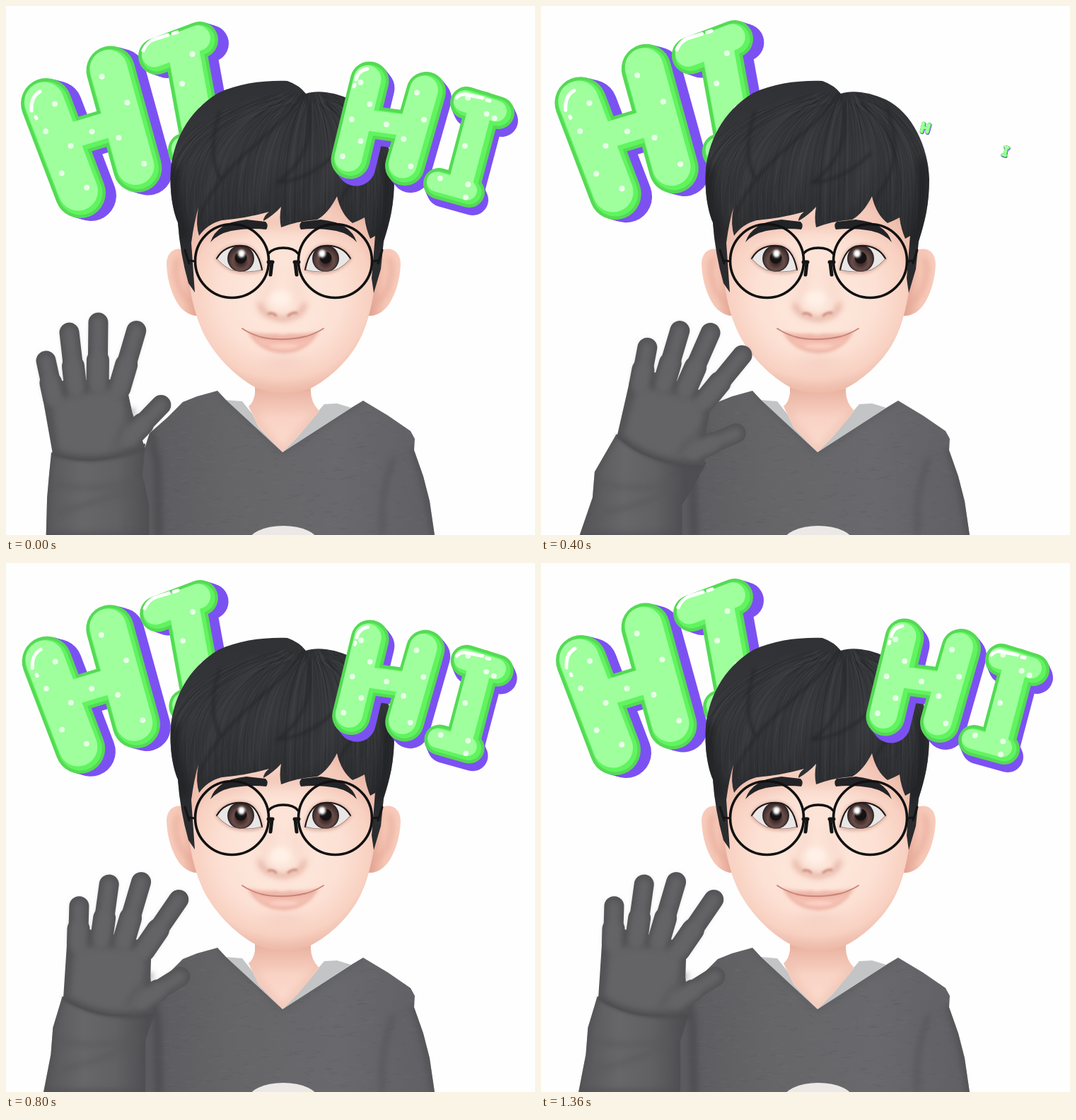
These frames come from a looping animation (748x748 px, 1.44 s). An HTML page with a canvas:

```html
<!DOCTYPE html>
<html lang="en">
<head>
<meta charset="utf-8">
<title>Waving hello</title>
<style>
html, body { margin: 0; width: 100%; height: 100%; overflow: hidden; background: #fefefe; }
canvas { display: block; width: 100vw; height: 100vh; }
</style>
</head>
<body>
<canvas id="stage" width="748" height="748"></canvas>
<script>
const SIZE = 748, STEP = 80, STEPS = 18;
let g = document.getElementById('stage').getContext('2d');

// ---------- helpers ----------
function random(seed) {
  return () => (seed = (seed * 16807) % 2147483647) / 2147483647;
}

function fill(d, color) {
  g.fillStyle = color;
  g.fill(new Path2D(d));
}

function line(d, color, width) {
  g.strokeStyle = color;
  g.lineWidth = width;
  g.stroke(new Path2D(d));
}

function ellipse(x, y, rx, ry, color) {
  g.fillStyle = color;
  g.beginPath();
  g.ellipse(x, y, rx, ry, 0, 0, 2 * Math.PI);
  g.fill();
}

function scoped(draw) {
  g.save();
  draw();
  g.restore();
}

function blurred(amount, draw) {
  scoped(() => { g.filter = `blur(${amount}px)`; draw(); });
}

function clipped(d, draw) {
  scoped(() => { g.clip(new Path2D(d)); draw(); });
}

function gradient(grad, ...colors) {
  colors.forEach((c, i) => grad.addColorStop(i / (colors.length - 1), c));
  return grad;
}

function layer(draw) {
  const canvas = document.createElement('canvas');
  canvas.width = canvas.height = SIZE;
  const previous = g;
  g = canvas.getContext('2d');
  g.lineCap = g.lineJoin = 'round';
  draw();
  g = previous;
  return canvas;
}

// Draws the left side, then its mirror image about the axis of the face.
function bothSides(draw) {
  scoped(() => draw(false));
  scoped(() => { g.translate(785, 0); g.scale(-1, 1); draw(true); });
}

// ---------- body ----------
const HOODIE = 'M299 544L270 552L250 560L228 582L203 604L188 650V748H606L599 700L590 665L577 628L578 612L572 601L540 579L505 558L490 567L391 631L312 558Z';
const NECK = 'M352 530V548Q350 561 343 566L357 596L391 631L412 610L443 573Q431 560 431 545V530Z';

function drawBody() {
  fill('M310 557L334 559L391 631Z', '#c2c4c6');
  fill('M488 568L468 562L450 563L391 631Z', '#c2c4c6');
  fill(NECK, gradient(g.createLinearGradient(0, 540, 0, 625), '#e9b19f', '#f9d3c5', '#fbdccf'));
  clipped(NECK, () => blurred(6, () => line('M345 555L357 592L391 632L445 570', '#eebfae', 7)));
  fill(HOODIE, gradient(g.createLinearGradient(200, 0, 606, 0), '#5c5c60', '#666669', '#69696d', '#606064'));
  clipped(HOODIE, () => {
    const rnd = random(41);
    for (let i = 0; i < 420; i++) {
      const x = 205 + rnd() * 395, y = 555 + rnd() * 190;
      line(`M${x} ${y}l${4 + rnd() * 9} ${rnd() * 6 - 3}`, rnd() < 0.5 ? '#5555583d' : '#7777792e', 1.5);
    }
    blurred(5, () => {
      line('M299 544L312 558L391 631L490 568L505 558', '#4f4f5280', 5);
      line('M532 748Q528 690 548 640', '#545457', 5);
      line('M205 606L214 650L216 748', '#4c4c50', 10);
      line('M606 748L590 665L577 628', '#4e4e51', 7);
    });
    ellipse(392, 759, 50, 24, '#ebe8e6');
  });
}

// ---------- head ----------
const FACE = 'M254 318C254 390 266 440 283 470C304 506 334 530 356 541Q392 554 430 541C452 530 482 506 499 474C517 440 525 390 528 318L500 255H280Z';
const HAIR = 'M243 306C236 290 231 262 233 232C236 195 255 150 300 123C330 109 365 105 398 106Q415 112 424 124C440 118 465 122 487 132C525 150 548 200 549 245C549 280 543 305 534 333L530 372L520 406L517 385L522 325L515 329Q509 315 507 299Q500 303 490 307Q474 295 468 269Q456 293 440 302Q412 304 389 313Q386 300 389 284Q378 296 364 304Q364 297 372 291Q340 300 305 303Q285 308 273 325Q268 310 272 285Q266 305 262 335L267 405L258 392Q246 350 243 306Z';

function drawFace() {
  bothSides(() => {
    const ear = 'M256 346C237 338 227 350 227 365C228 395 240 422 252 431Q262 439 273 438Z';
    fill(ear, gradient(g.createLinearGradient(227, 0, 272, 0), '#f8cdbd', '#f6c6b5', '#e0a08e'));
    clipped(ear, () => blurred(4, () => line('M243 358Q235 372 246 400Q252 413 263 420', '#e5a897', 5)));
  });
  fill(FACE, gradient(g.createRadialGradient(388, 415, 50, 391, 398, 162),
    '#fde5d9', '#fce0d3', '#f8d1c2', '#e6ad9b'));
  clipped(FACE, () => {
    blurred(9, () => {
      line('M258 320L282 318L370 306L440 307L526 325', '#efc1b1', 14);
      line('M345 541Q392 553 440 540', '#eeb8a5', 9);
      line('M376 372Q370 402 362 420M407 374Q412 402 420 418', '#f2c6b7', 5);
      ellipse(392, 505, 30, 5, '#f2c7b9');
    });
    blurred(4, () => {
      line('M359 422Q363 437 378 439Q391 446 405 439Q418 437 422 422', '#dda08f', 5);
      ellipse(388, 414, 15, 12, '#fff0e7');
    });
    blurred(1.5, () => line('M371 435Q378 433 382 438M399 438Q404 433 411 434', '#c07c6e', 2.5));
    blurred(2, () => {
      fill('M341 460Q365 465 382 463Q391 466 400 463Q420 465 443 460Q424 491 392 491Q358 490 341 460Z', '#eeb6a8');
      fill('M350 469Q392 480 435 469Q420 487 392 487Q364 486 350 469Z', '#f4c0b2');
      ellipse(393, 481, 20, 3, '#fbd2c6');
    });
    line('M334 456Q344 463 360 468Q390 475 425 467Q438 463 449 456', '#c98476', 1.8);
  });
}

function drawHair() {
  fill(HAIR, gradient(g.createLinearGradient(0, 105, 0, 330), '#303134', '#37383b', '#2b2c2f'));
  clipped(HAIR, () => {
    const rnd = random(7);
    for (let i = 0; i < 240; i++) {
      const x = 225 + rnd() * 330, y = 270 + rnd() * 55;
      const bend = x + (x - 410) * 0.12;
      line(`M${424 + (x - 400) * 0.28} ${122 + rnd() * 20}Q${bend} ${165 + rnd() * 30} ${x} ${y}`,
        rnd() < 0.5 ? '#1d1e212a' : '#56575b28', 1.3);
    }
    blurred(7, () => {
      line('M350 145Q310 200 270 300M390 155Q370 215 345 280M470 150Q475 215 430 285', '#4446494d', 16);
      line('M540 220Q542 280 528 330M236 230Q236 280 250 325', '#1f2023', 13);
    });
    const locks = 'M422 124C390 170 335 205 304 246Q283 210 302 150M424 126C440 180 420 225 383 250Q430 246 466 208M489 145Q513 205 485 255Q462 286 468 303M304 246Q278 280 270 310';
    blurred(2, () => line(locks, '#26272a', 3));
  });
}

const EYE = 'M298 357C306 343 320 338 335 339C350 340 358 352 362 373C350 378 331 378 318 373Q306 367 298 357Z';
const LID = 'M298 357C306 343 320 338 335 339C350 340 358 352 362 373';
const BROW = 'M289 334Q298 306 340 302L367 305Q372 310 368 316Q345 313 318 318Q300 322 289 334Z';

function squash(y, amount) {
  g.translate(0, y * (1 - amount));
  g.scale(1, amount);
}

function drawEyes(open) {
  bothSides(mirrored => {
    scoped(() => {
      squash(335, 0.72 + 0.28 * open);
      fill(BROW, '#222326');
    });
    if (open === 0) {
      blurred(5, () => line('M305 345Q330 330 358 345', '#e8b8a8', 8));
      line('M298 363Q320 371 361 366', '#2a211f', 4);
      line('M310 367Q330 370 352 367', '#a5968e', 1);
      return;
    }
    scoped(() => {
      squash(366, open);
      blurred(2, () => line(EYE, '#d69d8c', 3));
      fill(EYE, '#e9e7e6');
      g.clip(new Path2D(EYE));
      g.setTransform(1, 0, 0, 1, 0, 0);
      const x = mirrored ? 452 : 332;
      ellipse(x, 357, 19, 19, '#33262a');
      ellipse(x, 358, 17, 17, gradient(g.createRadialGradient(x, 361, 5, x, 361, 18), '#402c2a', '#6a4d48', '#463431'));
      ellipse(x, 356, 8.5, 8.5, '#161214');
      blurred(1.5, () => ellipse(mirrored ? 447 : 333, 350, 5, 5.5, '#fff'));
    });
    scoped(() => {
      squash(366, open);
      line(LID, '#211a19', 2.2);
      line('M298 357Q306 367 318 373Q340 379 362 373', '#8a6a60', 0.8);
    });
  });
}

function drawGlasses() {
  bothSides(() => {
    line('M267.5 360.5A52 52 0 1 1 371.5 360.5A52 52 0 1 1 267.5 360.5', '#111', 3.6);
    line('M267 361L259 360M259 364L253 345', '#151515', 3);
    line('M371 362L377 362M376 363L374 380', '#151515', 5);
  });
  line('M371 350Q378 342 392 342Q407 342 413 350', '#111', 3.6);
}

// ---------- letters ----------
// bars: x1, y1, x2, y2, width, number of dots (a minus starts on the other side)
const leftLetters = [{
  origin: [102, 192], depth: [15, 4], delay: 3,
  bars: [[57, 138, 105, 264, 72, 5], [148, 91, 186, 229, 69, -4], [82, 190, 165, 165, 52, 1]],
  shine: 'M36 148Q35 128 48 121M42 157L43 159'
}, {
  origin: [296, 122], depth: [15, 5], delay: 3,
  bars: [[213, 71, 274, 48, 52, 0], [254, 65, 276, 186, 60, 4], [254, 204, 300, 188, 50, 0]],
  shine: 'M194 63Q199 51 210 47L229 41M236 39L242 37'
}];
const rightLetters = [{
  origin: [544, 173], depth: [8, 10], delay: 5,
  bars: [[514, 106, 487, 217, 55, -5], [594, 121, 564, 226, 56, -4], [500, 162, 580, 173, 46, 1]],
  shine: 'M495 104Q498 91 511 89M493 111L492 114'
}, {
  origin: [657, 206], depth: [5, 11], delay: 5,
  bars: [[651, 137, 696, 151, 46, 2], [674, 146, 646, 252, 50, 3], [612, 251, 655, 263, 44, 2]],
  shine: 'M637 130Q642 124 650 125L674 130M680 133L684 134'
}];

// Fast growth, then one overshoot and recoil before resting.
function pop(n) {
  if (n < 2) return 0.1 + 0.46 * n;
  return n < 7.5 ? 1 + 0.04 * Math.cos(Math.PI * (n - 3) / 3) : 1;
}

// Dots zigzag along a bar.
function drawDots([x1, y1, x2, y2, width, dots]) {
  const count = Math.abs(dots), length = Math.hypot(x2 - x1, y2 - y1);
  for (let i = 0; i < count; i++) {
    const t = count === 1 ? 0.5 : 0.04 + 0.94 * i / (count - 1);
    const side = count === 1 ? 0 : Math.sign(dots) * (i % 2 ? -1 : 1) * width * 0.18 / length;
    ellipse(x1 + (x2 - x1) * t + (y2 - y1) * side - 2, y1 + (y2 - y1) * t - (x2 - x1) * side, 4, 4, '#e9ffe8');
  }
}

function drawLetter({ origin: [x, y], depth: [ox, oy], delay, bars, shine }, step) {
  const age = (step || STEPS) - delay;
  if (age < 0) return;
  const stack = (color, inset, dx, dy) => bars.forEach(([x1, y1, x2, y2, width]) =>
    line(`M${x1 + dx} ${y1 + dy}L${x2 + dx} ${y2 + dy}`, color, width - inset));
  scoped(() => {
    g.translate(x, y);
    g.scale(pop(age), pop(age));
    g.translate(-x, -y);
    for (const k of [1, 0.66, 0.33]) stack('#7c51f2', 0, ox * k, oy * k);
    stack('#55da55', 0, 0, 0);
    stack('#60f45f', 9, 0, 0);
    stack('#9eff9c', 16, -3, -2.5);
    bars.forEach(drawDots);
    line(shine, '#fff', 5);
  });
}

// ---------- waving hand ----------
const CYCLE = 7;
const waveKeys = [[0, 4], [5, 9], [8, 13], [11, 19], [14, 21], [18, 25]];

function wavePhase(step) {
  const i = waveKeys.findIndex(([at]) => at > step);
  const [t0, p0] = waveKeys[i - 1], [t1, p1] = waveKeys[i];
  return p0 + (p1 - p0) * (step - t0) / (t1 - t0);
}

function drawHand(step) {
  const phase = wavePhase(step);
  const swing = peak => Math.cos(2 * Math.PI * (phase - peak) / CYCLE);
  // The forearm leads, the tilt of the palm follows, the fingers fan last.
  const lift = swing(-0.7), sway = swing(0.65), fan = swing(3);
  const wx = 153 + 27 * sway, wy = 638 + 7 * lift;
  const tilt = (6 + 16 * swing(1.7)) * Math.PI / 180;
  const left = 70 + 11 * sway, foot = 60 + 7 * lift, right = 203 + 10 * lift;
  const c = Math.cos(tilt), s = Math.sin(tilt);
  const at = (x, y) => `${wx + x * c - y * s} ${wy + x * s + y * c}`;

  const sleeve = `M${at(-62, -5)}L${left + 2} ${wy + 26}L${left - 1} 695L${foot} 748H${right + 4}V705L${at(66, 30)}L${at(71, -14)}Z`;
  fill(sleeve, gradient(g.createLinearGradient(left, 0, right + 8, 0), '#5a5a5d', '#67676a', '#616164', '#4f4f53'));
  clipped(sleeve, () => blurred(4, () => {
    line(sleeve, '#4f4f52', 5);
    line(`M${left + 15} 716Q${wx - 10} 705 ${right - 8} 680M${left + 8} 675Q${wx} 690 ${right} 668`, '#58585b', 4);
  }));

  const fingers = [[50, -24, 95, -68]];
  for (let i = 0; i < 4; i++) {
    const arch = (i - 2) ** 2;
    fingers.push([31 * i - 56, 4 * arch - 98, 32 * i - 66 + 0.8 * i ** 3 + 2 * i * i * fan, 13 * arch - 187]);
  }
  const drawFingers = (color, width) => fingers.forEach(([x1, y1, x2, y2]) => {
    line(`M${at(x1, y1)}L${at(x2, y2)}`, color, width);
    line(`M${at(x1, y1)}L${at(x1 + (x2 - x1) * 0.4, y1 + (y2 - y1) * 0.4)}`, color, width + 4);
  });
  const palm = `M${at(-60, -2)}L${at(-72, -82)}L${at(-45, -106)}L${at(45, -106)}L${at(54, -58)}L${at(70, -10)}Q${at(0, 22)} ${at(-60, -2)}Z`;
  fill(palm, '#535356');
  drawFingers('#535356', 28);
  blurred(4, () => {
    fill(`M${at(-52, -8)}L${at(-60, -80)}L${at(40, -96)}L${at(46, -50)}L${at(58, -14)}Q${at(0, 12)} ${at(-52, -8)}Z`, '#646467');
    drawFingers('#646467', 17);
    line(`M${at(55, -62)}Q${at(36, -38)} ${at(28, -10)}`, '#57575a', 4);
  });
  const cuff = `M${at(-60, -3)}Q${at(-8, 20)} ${at(70, -6)}`;
  blurred(2, () => line(cuff, '#4b4b4e', 3));
}

// ---------- playback ----------
const body = layer(drawBody);
const head = layer(() => { drawFace(); drawHair(); });
const glasses = layer(drawGlasses);

function draw(step) {
  g.fillStyle = '#fefefe';
  g.fillRect(0, 0, SIZE, SIZE);
  g.lineCap = g.lineJoin = 'round';
  leftLetters.forEach(letter => drawLetter(letter, step));
  g.drawImage(body, 0, 0);
  g.drawImage(head, 0, 0);
  drawEyes(Math.min(1, Math.abs(step - 14) / 2));
  g.drawImage(glasses, 0, 0);
  rightLetters.forEach(letter => drawLetter(letter, step));
  drawHand(step);
}

const start = performance.now();
let shown = -1;
function tick() {
  const step = Math.floor((performance.now() - start) / STEP) % STEPS;
  if (step !== shown) draw(shown = step);
  requestAnimationFrame(tick);
}
tick();
</script>
</body>
</html>
```
